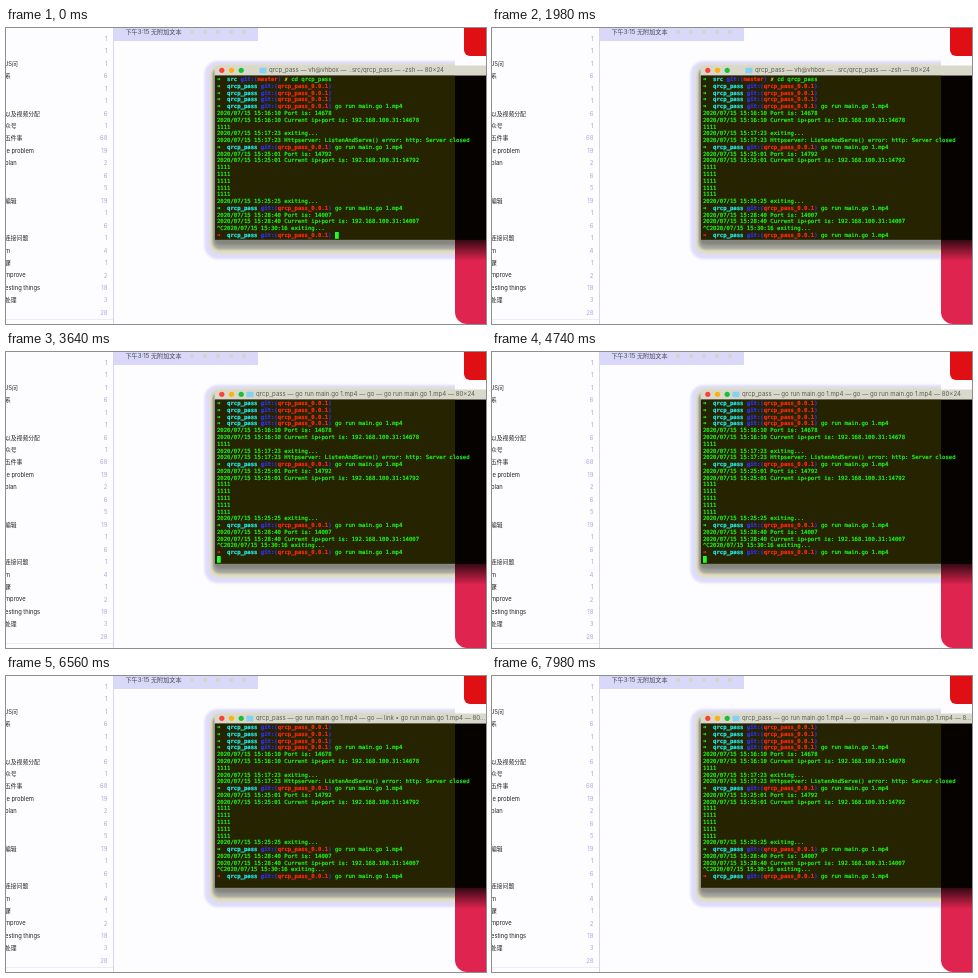
Animation of 480x296 px, one loop 8000 ms. Source, as an HTML page with a canvas:

```html
<!DOCTYPE html>
<html lang="zh">
<head>
<meta charset="utf-8">
<style>
  html, body { margin: 0; width: 100%; height: 100%; overflow: hidden; background: #fdfdff; }
  canvas { display: block; width: 480px; height: 296px; }
</style>
</head>
<body>
<canvas id="stage"></canvas>
<script>
const LOOP = 8000, TYPED = 840, ENTERED = 3340, LINKING = 5020, RUNNING = 7540;
const BLINK = 1200;
const CELL_W = 3.371, CELL_H = 6.783, TERM_X = 211, TERM_Y = 51.6, ROWS = 24;
const UI = 'Inter, "Noto Sans CJK SC", "Noto Sans CJK", sans-serif';
const MONO = '"DejaVu Sans Mono", monospace';
const GREEN = '#20ff20', CYAN = '#20f0f0', BLUE = '#3030ff', RED = '#ff2a10';

const canvas = document.getElementById('stage');
const ratio = window.devicePixelRatio || 1;
canvas.width = 480 * ratio;
canvas.height = 296 * ratio;
const ctx = canvas.getContext('2d');
ctx.scale(ratio, ratio);
ctx.textBaseline = 'middle';
ctx.lineWidth = 0.2;

const rect = (color, x, y, w, h) => {
  ctx.fillStyle = color;
  ctx.fillRect(x, y, w, h);
};

function panel(color, x, y, w, h, radius) {
  ctx.fillStyle = color;
  ctx.beginPath();
  ctx.roundRect(x, y, w, h, radius);
  ctx.fill();
}

function dot(color, x, y, r) {
  ctx.fillStyle = color;
  ctx.beginPath();
  ctx.arc(x, y, r, 0, 7);
  ctx.fill();
}

function label(text, x, y, color, font, align = 'left') {
  ctx.font = font;
  ctx.fillStyle = color;
  ctx.textAlign = align;
  ctx.fillText(text, x, y);
}

// A terminal line is a list of [text, colour, bold] runs.
const prompt = (command = '', arrow = GREEN) => [
  ['➜  ', arrow, true], ['qrcp_pass ', CYAN, true], ['git:(', BLUE, true],
  ['qrcp_pass_0.0.1', RED, true], [') ', BLUE, true], [command, GREEN]
];
const plain = text => [[text, GREEN]];
const log = (time, text) => plain(`2020/07/15 ${time} ${text}`);
const RUN = 'go run main.go 1.mp4';
const session = (time, port) => [
  prompt(RUN),
  log(time, `Port is: ${port}`),
  log(time, `Current ip+port is: 192.168.100.31:${port}`)
];

const history = [
  [['➜  ', GREEN, true], ['src ', CYAN, true], ['git:(', BLUE, true], ['master', RED, true],
   [') ', BLUE, true], ['✗ ', '#e8e020', true], ['cd qrcp_pass', GREEN]],
  prompt(), prompt(), prompt(),
  ...session('15:16:10', 14678),
  plain('1111'),
  log('15:17:23', 'exiting...'),
  log('15:17:23', 'Httpserver: ListenAndServe() error: http: Server closed'),
  ...session('15:25:01', 14792),
  ...Array(5).fill(plain('1111')),
  log('15:25:25', 'exiting...'),
  ...session('15:28:40', 14007),
  plain('^C2020/07/15 15:30:16 exiting...')
];

const counts = [1, 1, 1, 6, 1, 1, 6, 1, 68, 19, 2, 6, 5, 19, 1, 6, 1, 4, 1, 2, 18, 3, 28];
const folders = {
  2: 'JS问', 3: '系', 6: '以及视频分配', 7: '众号', 8: '五件事', 9: 'ie problem', 10: 'plan',
  13: '编辑', 16: '连接问题', 17: 'm', 18: '骤', 19: 'mprove', 20: 'esting things', 21: '处理'
};

function drawNotes() {
  rect('#fdfdff', 0, 0, 450, 296);
  counts.forEach((count, i) => {
    const y = 11 + i * 12.46;
    label(count, 101.5, y, '#a9a8e0', `6px ${UI}`, 'right');
    if (folders[i]) label(folders[i], -1, y, '#222222', `5.8px ${UI}`);
  });
  rect('#e6e6f2', 0, 291, 107, 0.7);
  rect('#d6d6ee', 107, 0, 1, 296);
  rect('#d9d8f8', 108, 0, 144, 13);
  label('下午3:15 无附加文本', 119.5, 3.8, '#45454c', `6.1px ${UI}`);
  for (let i = 0; i < 5; i++) rect('#d4d4d0', 184 + i * 13, 2, 4, 4);
}

function drawWallpaper() {
  rect('#fdfdff', 449, 0, 31, 296);
  panel('#e00f14', 458, -8, 32, 36, 6);
  panel('#df2450', 449, 200, 40, 96, [0, 0, 0, 12]);
}

function drawShadow() {
  ctx.save();
  ctx.beginPath();
  ctx.rect(0, 0, 449, 296);
  ctx.clip();
  ctx.filter = 'blur(0.8px)';
  panel('#dedcfb', 198.5, 33, 300, 198, 13);
  panel('#e0deb8', 204, 36.5, 300, 189, 9);
  panel('#a2a29e', 206.5, 40, 300, 181.5, 7);
  panel('#868680', 208, 40, 300, 177, 6);
  ctx.restore();

  const fade = ctx.createLinearGradient(0, 211, 0, 233);
  fade.addColorStop(0, 'rgba(0, 0, 0, 0.8)');
  fade.addColorStop(1, 'rgba(0, 0, 0, 0)');
  rect(fade, 449, 211, 31, 22);
}

function titleAt(t) {
  if (t < ENTERED) return 'qrcp_pass — vh@vhbox — ..src/qrcp_pass — -zsh — 80×24';
  const start = `qrcp_pass — ${RUN} — go — `;
  if (t < LINKING) return `${start}${RUN} — 80×24`;
  return t < RUNNING ? `${start}link • ${RUN} — 80…` : `${start}main • ${RUN} — 8…`;
}

function drawWindow(t) {
  panel('#d9d9cb', 208.5, 37.5, 290, 10, [4, 0, 0, 0]);
  rect('#262300', 209, 47.5, 240, 164.3);
  rect('#050200', 449, 47.5, 31, 164.3);
  ['#ff4038', '#fdb010', '#18c038'].forEach((color, i) => dot(color, 215.8 + i * 9.7, 42.3, 2.6));
  const left = t < ENTERED ? 263 : 250;
  panel('#86d0f4', left - 9.5, 39.8, 7, 5.4, 0.8);
  label(titleAt(t), left, 42.5, '#5c5c55', `6.1px ${UI}`);
}

function drawLine(runs, row) {
  let column = 0;
  for (const [text, color, bold] of runs) {
    const x = TERM_X + column * CELL_W, y = TERM_Y + row * CELL_H;
    label(text, x, y, color, `${bold ? 'bold ' : ''}5.6px ${MONO}`);
    // A hairline outline keeps the tiny glyphs bright.
    ctx.strokeStyle = color;
    ctx.strokeText(text, x, y);
    column += text.length;
  }
  return column;
}

function drawTerminal(t) {
  const lines = [...history, prompt(t < TYPED ? '' : RUN, RED)];
  if (t >= ENTERED) lines.push([]);
  let column = 0;
  lines.slice(-ROWS).forEach((line, row) => column = drawLine(line, row));

  // Each key press restarts the blink with the cursor shown.
  const lastKey = t >= ENTERED ? ENTERED : t >= TYPED ? TYPED : 0;
  if ((t - lastKey) % BLINK < BLINK / 2)
    rect(GREEN, TERM_X + column * CELL_W, TERM_Y + (ROWS - 1) * CELL_H - 3.6, CELL_W + 0.4, 6.8);
}

function draw(now) {
  const t = now % LOOP;
  drawNotes();
  drawWallpaper();
  drawShadow();
  drawWindow(t);
  drawTerminal(t);
  requestAnimationFrame(draw);
}
requestAnimationFrame(draw);
</script>
</body>
</html>
```
